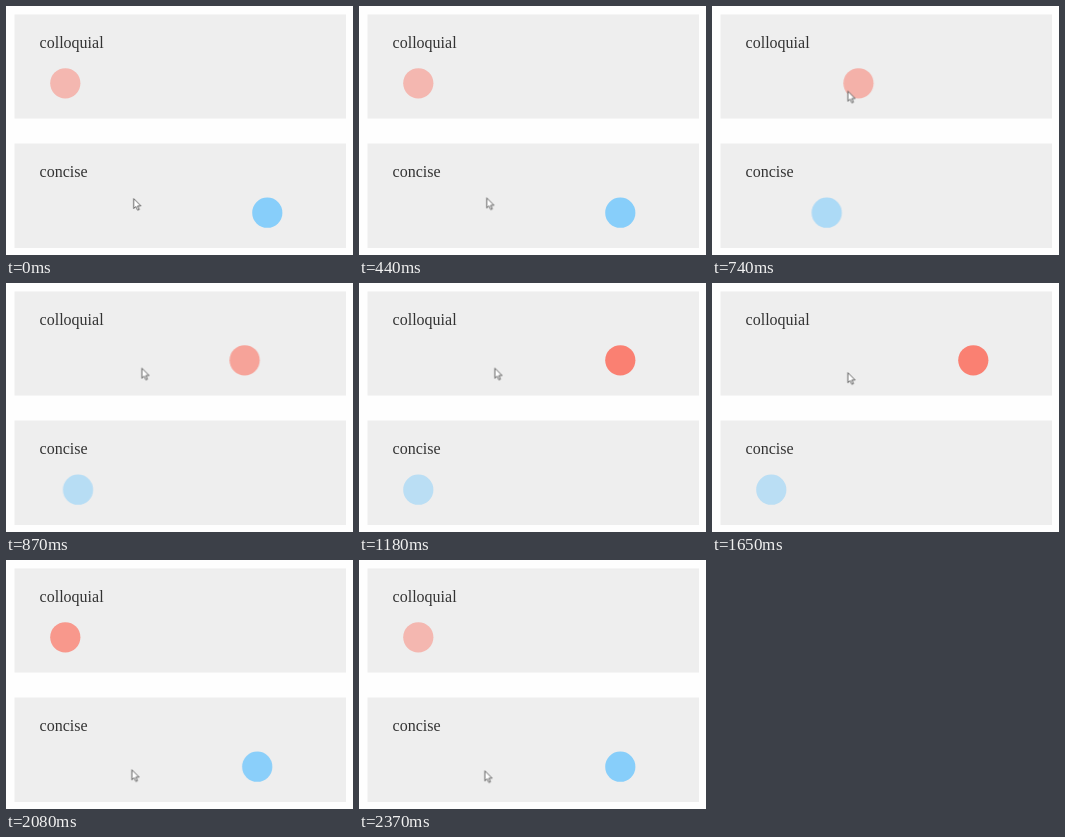
These frames come from a looping animation (347x249 px, 2920 ms). An HTML page:

```html
<!DOCTYPE html>
<html lang="en">
<head>
<meta charset="utf-8">
<title>Two transitions</title>
<style>
  html, body {
    margin: 0;
    width: 100%;
    height: 100%;
    overflow: hidden;
    background: #fefefe;
  }
  svg { display: block; }
  .panel { fill: #eee; }
  text {
    font: 16px "Liberation Serif", "Times New Roman", serif;
    fill: #333;
  }
  .ball, .cursor {
    animation-duration: 2.92s;
    animation-iteration-count: infinite;
    animation-timing-function: linear;
  }
  .salmon {
    fill: #fa8072;
    animation-name: slide, brighten;
  }
  .sky {
    fill: #87cefa;
    animation-name: glide;
    animation-timing-function: ease;
  }
  .cursor {
    fill: #fff;
    stroke: #444;
    stroke-width: .8;
    animation-name: point;
  }

  @keyframes slide {
    0%, 21.164%   { transform: translateX(0); }
    30.925%, 58.219% { transform: translateX(202px); }
    68.493%, 100% { transform: translateX(0); }
  }
  @keyframes brighten {
    0%, 23.63%    { opacity: .5; }
    40.411%, 64.041% { opacity: 1; }
    81.164%, 100% { opacity: .5; }
  }
  @keyframes glide {
    0%, 17.979%   { transform: translateX(202px); opacity: 1; }
    35.103%, 58.904% { transform: translateX(0); opacity: .5; }
    76.027%, 100% { transform: translateX(202px); opacity: 1; }
  }
  @keyframes point {
    0%, 15.068%   { transform: translate(127.3px, 192px); }
    17.979%       { transform: translate(131px, 138px); }
    21.164%       { transform: translate(135.5px, 86.3px); }
    22.432%, 56.164% { transform: translate(135.5px, 84.6px); }
    56.507%       { transform: translate(135.5px, 88.6px); }
    58.219%       { transform: translate(134.8px, 112.5px); }
    58.904%       { transform: translate(134px, 138px); }
    61.301%       { transform: translate(130px, 180px); }
    66.438%       { transform: translate(125.5px, 208.5px); }
    78.767%, 100% { transform: translate(125.5px, 210.3px); }
  }
</style>
</head>
<body>
<svg width="347" height="249" viewBox="0 0 347 249">
  <rect class="panel" x="8.5" y="8.5" width="331.5" height="104"/>
  <text x="33.6" y="42">colloquial</text>
  <circle class="ball salmon" cx="59.3" cy="77.3" r="15.1"/>

  <rect class="panel" x="8.5" y="137.5" width="331.5" height="104.5"/>
  <text x="33.6" y="171">concise</text>
  <circle class="ball sky" cx="59.3" cy="206.7" r="15.1"/>

  <path class="cursor" d="M.4 .6V10.6L2.7 8.5L4.4 12.2L6 11.5L4.4 7.9H7.6Z"/>
</svg>
</body>
</html>
```
